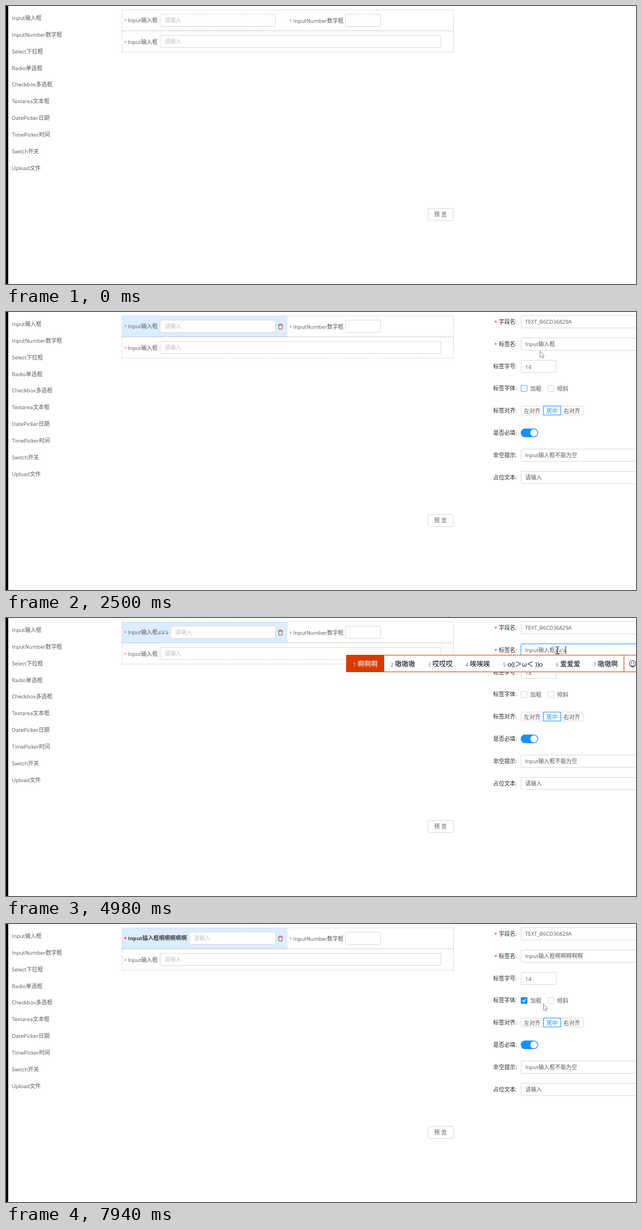
Write an HTML page with a canvas that moves like this. It is 1126 px wide and 498 px high and loops after 8 s.

```html
<!DOCTYPE html>
<html lang="zh-CN">
<head>
<meta charset="utf-8">
<title>Form designer</title>
<style>
html, body { margin: 0; width: 100%; height: 100%; overflow: hidden; background: #fff }
canvas { display: block }
</style>
</head>
<body>
<canvas id="stage" width="1126" height="498"></canvas>
<script>
const g = document.getElementById('stage').getContext('2d');
const LOOP = 8000, STEP = 77, ROW = 39.8, EM = 9.94;
const GREY = '#595959', DARK = '#262626', LINE = '#d9d9d9', HINT = '#bfbfbf';
const BLUE = '#1890ff', SKY = '#40a9ff', RED = '#f5222d', ROSE = '#f4646c', IME = '#d83b01';

// Moments of the story
const SELECT = 1330, FOCUS = 3900, TYPE = 4680, COMMIT = 5620, BLUR = 7420, CHECK = 7569;
const CLICKS = [[1180, SELECT], [3730, FOCUS], [BLUR, CHECK]];

const MENU = ['Input输入框', 'InputNumber数字框', 'Select下拉框', 'Radio单选框', 'Checkbox多选框',
  'Textarea文本框', 'DatePicker日期', 'TimePicker时间', 'Switch开关', 'Upload文件'];
const PROPS = ['字段名', '标签名', '标签字号', '标签字体', '标签对齐', '是否必填', '非空提示', '占位文本'];

// Pointer moves, each from where the last one ended
const START = { x: 1003, y: 346 };
const MOVES = [
  { from: 70, till: 400, x: 277, y: 21, bend: 0 },
  { from: 540, till: 780, x: 240, y: 26, bend: -11 },
  { from: 1730, till: 2192, x: 928, y: 137, bend: -70 },
  { from: 2269, till: 2500, x: 954, y: 70, bend: 0 },
  { from: 2580, till: 3040, x: 985, y: 58, bend: -54 },
  { from: 6470, till: 7110, x: 925, y: 139, bend: 12 },
  { from: 7643, till: 7940, x: 967, y: 143.5, bend: 0 }
];

const within = (t, a, b) => t >= a && t < b;
const ramp = (t, a, d = 300) => Math.max(0, Math.min(1, (t - a) / d));
const rowY = i => Math.round(ROW * i);

// Latin and CJK runs use separate fonts; returns the end of the text
function text(s, x, y, color = GREY, size = EM, bold = '') {
  g.fillStyle = color;
  for (const run of s.match(/[\u3000-\u9fff\uff00-\uffef]+|[^\u3000-\u9fff\uff00-\uffef]+/g)) {
    const cjk = run[0] >= '\u3000';
    g.font = `${bold} ${cjk ? size : size * .955}px ${cjk ? '"Noto Sans CJK SC"' : '"Open Sans"'}, sans-serif`;
    g.fillText(run, x, y);
    x += g.measureText(run).width;
  }
  return x;
}

function box(x, y, w, h, color = LINE, fill = '#fff', r = 2) {
  g.beginPath();
  g.roundRect(x + .5, y + .5, w, h, r);
  if (fill) { g.fillStyle = fill; g.fill(); }
  g.strokeStyle = color;
  g.lineWidth = 1;
  g.stroke();
}

function path(points, color, width = 1) {
  g.beginPath();
  for (const p of points) g.lineTo(...p);
  g.strokeStyle = color;
  g.lineWidth = width;
  g.stroke();
}

function faded(alpha, draw) {
  g.save();
  g.globalAlpha = alpha;
  draw();
  g.restore();
}

function disc(x, y, r, color) {
  g.beginPath();
  g.arc(x, y, r, 0, 7);
  g.fillStyle = color;
  g.fill();
}

function label(s, x, y, bold) {
  text('*', x - 7, y + 1, bold ? RED : ROSE, 8.6, bold);
  return text(s, x, y, bold ? '#404040' : GREY, EM, bold);
}

function field(x, y, right, hint = '') {
  box(x, y, right - x, 22);
  if (hint) text(hint, x + 8.5, y + 15, HINT);
}

function trash(x, y) {
  const c = '#c0432f';
  path([[x, y + 2.5], [x + 9, y + 2.5]], c);
  path([[x + 2.5, y + 2], [x + 2.5, y + .5], [x + 6.5, y + .5], [x + 6.5, y + 2]], c);
  path([[x + 1.3, y + 3], [x + 1.8, y + 9.5], [x + 7.2, y + 9.5], [x + 7.7, y + 3]], c);
}

function form(t, extra) {
  const picked = t >= SELECT;
  if (picked) {
    g.fillStyle = '#dcedff';
    g.fillRect(208, 7, 295, 38);
  }
  g.setLineDash([2, 1.6]);
  path([[207.5, 83], [207.5, 7], [799.5, 7], [799.5, 83]], '#c8c8c8');
  path([[207, 82.5], [800, 82.5]], '#c8c8c8');
  path([[207, 44.5], [800, 44.5]], '#adadad');
  g.setLineDash([]);

  const end = label('Input输入框' + extra, 218, 29, t >= CHECK ? 'bold' : '');
  field(Math.round(end + 3.6), 14, 481, '请输入');
  if (picked) trash(486, 21);
  label('InputNumber数字框', 513.5, 30);
  field(606, 14, 669);
  label('Input输入框', 218, 67.5);
  field(275, 52, 777, '请输入');

  box(754, 362, 45, 22);
  text('预 览', 765.3, 377);
}

function nameField(t, extra, composing) {
  if (within(t, FOCUS, BLUR)) faded(.2, () => box(919, 45, 302, 24, BLUE, null, 3));
  const glow = t < BLUR ? ramp(t, 2640) : 1 - ramp(t, BLUR);
  faded(glow, () => box(920, 46, 300, 22, SKY, null));

  const start = text('Input输入框', 928, 61);
  const end = extra ? text(extra, start, 61) : start;
  if (composing) {
    g.setLineDash([1, 1]);
    path([[start, 63.5], [end, 63.5]], '#444');
    g.setLineDash([]);
  }
  const blinkOn = Math.floor((t - COMMIT) / 545) % 2 === 0;
  if (within(t, FOCUS, 4280) || composing || (within(t, COMMIT, BLUR) && blinkOn)) {
    g.fillStyle = '#222';
    g.fillRect(Math.round(end), 50, 1, 14);
  }
}

function props(t, extra, composing) {
  PROPS.forEach((s, i) => {
    const x = 910.6 - EM * s.length, y = 21 + rowY(i);
    if (i < 2) text('*', x - 8, y + 1, RED);
    text(s + ':', x, y, DARK);
  });
  for (const i of [0, 1, 6, 7]) field(920, 6 + rowY(i), 1220);
  field(920, 6 + rowY(2), 983);
  text('TEXT_B6CD36829A', 928, 21);
  nameField(t, extra, composing);
  text('14', 928, 101.5);
  text('Input输入框不能为空', 928, 21 + rowY(6));
  text('请输入', 928, 21 + rowY(7));

  ['加粗', '倾斜'].forEach((s, i) => {
    box(920 + 48 * i, 131, 11, 11, LINE, '#fff', 1.5);
    text(s, 937 + 48 * i, 141);
  });
  const hover = t < TYPE ? ramp(t, 2150, 60) * (1 - ramp(t, 2400)) : ramp(t, 7000);
  faded(hover, () => box(920, 131, 11, 11, BLUE, null, 1.5));
  if (t >= CHECK) {
    box(920, 131, 11, 11, BLUE, BLUE, 1.5);
    path([[923, 137], [925.2, 139.3], [929, 134.3]], '#fff', 1.4);
  }

  box(920, 168, 111, 16);
  box(960, 168, 31, 16, BLUE, '#fff', 0);
  text('左对齐', 925.5, 180.5);
  text('居中', 966, 180.5, BLUE);
  text('右对齐', 996.5, 180.5);

  g.beginPath();
  g.roundRect(920, 208.7, 31.2, 15.6, 7.8);
  g.fillStyle = BLUE;
  g.fill();
  disc(943.5, 216.5, 6.4, '#fff');
}

function candidates(n) {
  const list = [...'啊嗷哎唉爱'].map(c => c.repeat(n));
  if (n === 3) list.splice(4, 0, 'o((＞ω＜ ))o');
  return [...list, '嗷'.repeat(n - 1) + '啊'];
}

function ime(list) {
  box(608, 66, 540, 30, IME, '#fff', 0);
  let x = 608;
  list.forEach((s, i) => {
    if (!i) {
      g.fillStyle = IME;
      g.fillRect(x, 66, s.length * 12 + 32, 31);
    }
    text(String(i + 1), x + 12.5, 86.5, i ? '#666' : '#fff', 8.6);
    x = text(s, x + 20.3, 87, i ? '#000' : '#fff', 12) + 10.7;
  });
  path([[1104.5, 66], [1104.5, 97]], IME);
  g.beginPath();
  g.arc(1120, 82, 5.8, 0, 7);
  g.moveTo(1123, 83.5);
  g.arc(1120, 83.5, 3, 0, Math.PI);
  g.strokeStyle = '#222';
  g.stroke();
  for (const side of [-2, 2]) disc(1120 + side, 80.5, .9, '#222');
}

function pointerAt(t) {
  const i = MOVES.findLastIndex(m => t >= m.from);
  if (i < 0) return null;
  const a = MOVES[i - 1] || START, b = MOVES[i];
  const step = Math.floor((t - b.from) / STEP + .1) + 1;
  const u = Math.min(1, step * STEP / (b.till - b.from + STEP));
  return {
    x: Math.round(a.x + (b.x - a.x) * u),
    y: Math.round(a.y + (b.y - a.y) * u + 2 * u * (1 - u) * b.bend)
  };
}

function pointer({ x, y }) {
  const overField = (x > 920 && within(y, 47, 69)) || (within(x, 276, 482) && within(y, 15, 37));
  g.save();
  g.translate(x, y);
  if (overField) {
    path([[.5, -5.5], [.5, 5.5]], '#222', 1.4);
    for (const s of [-1, 1]) path([[-3, 6.5 * s], [-1, 6.5 * s], [.5, 5.5 * s], [2, 6.5 * s], [4, 6.5 * s]], '#222');
  } else {
    g.fillStyle = '#fff';
    const arrow = [[.5, .5], [.5, 11], [3, 8.8], [4.8, 12.8], [6.6, 12], [4.9, 8.2], [8, 8], [.5, .5]];
    path(arrow, '#111', .9);
    g.fill();
  }
  g.restore();
}

function frame(t) {
  const count = Math.max(0, Math.min(5, Math.floor((t - TYPE) / 150) + 1));
  const composing = within(t, TYPE, COMMIT);
  const extra = composing ? Array(count).fill('a').join("'") : '啊'.repeat(count);

  g.fillStyle = '#fff';
  g.fillRect(0, 0, 1126, 498);
  g.fillStyle = '#000';
  g.fillRect(0, 0, 4, 498);
  MENU.forEach((s, i) => text(s, 10.5, 25 + Math.round(29.85 * i)));
  form(t, extra);
  if (t >= SELECT) props(t, extra, composing);
  if (composing) ime(candidates(count));

  const at = pointerAt(t);
  if (!at) return;
  if (CLICKS.some(([a, b]) => within(t, a, b))) {
    g.globalCompositeOperation = 'multiply';
    disc(at.x + .5, at.y - .5, 8.6, '#fff22a');
    g.globalCompositeOperation = 'source-over';
  }
  pointer(at);
}

let begin;
function tick(now) {
  begin ??= now;
  frame((now - begin) % LOOP);
  requestAnimationFrame(tick);
}
requestAnimationFrame(tick);
</script>
</body>
</html>
```
